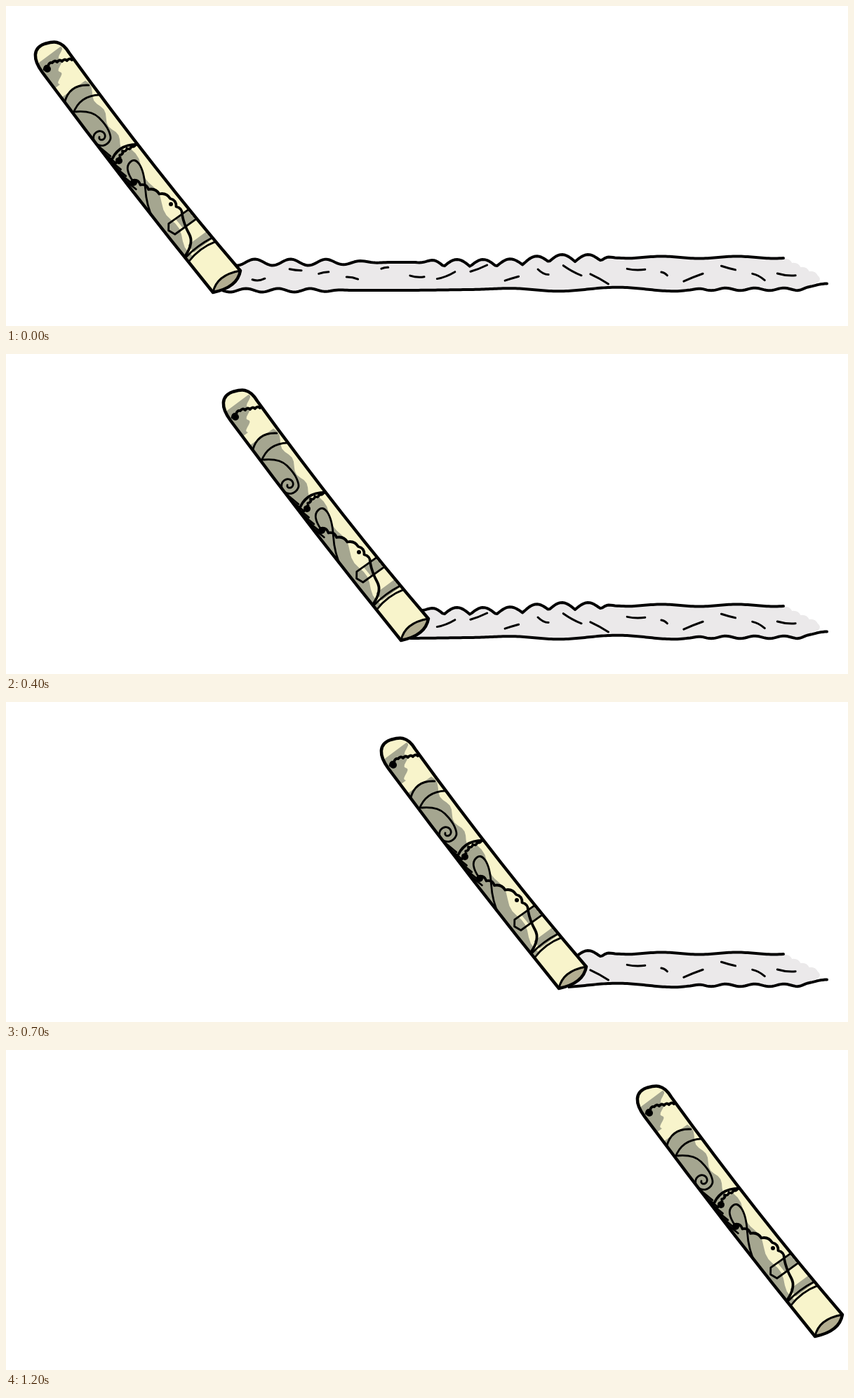
An HTML page with a canvas for the animation above (1.3 s loop, 1200 by 457 pixels).

```html
<!DOCTYPE html>
<html lang="en">
<head>
<meta charset="utf-8">
<title>Rolled note</title>
<style>
html, body { margin: 0; width: 100%; height: 100%; overflow: hidden; background: #fff; }
canvas { display: block; width: 100%; height: 100%; }
</style>
</head>
<body>
<canvas id="stage" width="1200" height="457"></canvas>
<script>
const ctx = document.getElementById('stage').getContext('2d');
const INK = '#000', CREAM = '#f8f4cb', SHADE = '#a5a690', MOUTH = '#b3ae91', POWDER = '#ebe9ea';
const STEP = 100, STEPS = 13;
const { sin, cos, abs, PI, hypot } = Math;

const mix = (a, b, k) => a + (b - a) * k;
const mixPoint = (a, b, k) => [mix(a[0], b[0], k), mix(a[1], b[1], k)];

// Smooth 0 to 1 between two limits
function ramp(x, from, to) {
  const k = Math.min(1, Math.max(0, (x - from) / (to - from)));
  return k * k * (3 - 2 * k);
}

function randomFrom(seed) {
  return () => {
    seed = (seed * 16807) % 2147483647;
    return seed / 2147483647;
  };
}

function polyline(pts, path = new Path2D()) {
  pts.forEach(p => path.lineTo(...p));
  return path;
}

// Smooth curve through points
function curve(pts) {
  const path = new Path2D(), last = pts.length - 1;
  path.moveTo(...pts[0]);
  for (let i = 1; i < last; i++) {
    const end = i === last - 1 ? pts[last] : mixPoint(pts[i], pts[i + 1], 0.5);
    path.quadraticCurveTo(...pts[i], ...end);
  }
  return path;
}

// Row of round bumps between each pair of points
function bumps(pts, size, height, path = new Path2D()) {
  path.lineTo(...pts[0]);
  for (let i = 1; i < pts.length; i++) {
    const a = pts[i - 1], b = pts[i], dx = b[0] - a[0], dy = b[1] - a[1];
    const len = hypot(dx, dy), n = Math.max(1, Math.round(len / size));
    for (let j = 0; j < n; j++) {
      const [x, y] = mixPoint(a, b, (j + 0.5) / n);
      path.quadraticCurveTo(x + dy / len * height, y - dx / len * height, ...mixPoint(a, b, (j + 1) / n));
    }
  }
  return path;
}

function stroke(path, width) {
  ctx.lineWidth = width;
  ctx.stroke(path);
}

function fill(path, color) {
  ctx.fillStyle = color;
  ctx.fill(path);
}

// Powder outline as functions of x
function topY(x) {
  const swell = 4.5 * cos((x - 380) / 8.1) * (1 - ramp(x, 440, 560));
  const inScallops = ramp(x, 580, 620) * (1 - ramp(x, 840, 870));
  const scallop = (6 - 10 * abs(sin((x - 624) * PI / 37.4))) * inScallops;
  const ripple = 1.5 * sin(x / 17) * ramp(x, 840, 900);
  return 366 - 7 * ramp(x, 700, 790) + swell + scallop + ripple;
}

function bottomY(x) {
  const left = 2.5 * cos((x - 365) / 7.3) * (1 - ramp(x, 430, 500));
  const middle = 2.8 * cos((x - 787) / 26.7) * ramp(x, 650, 780) * (1 - ramp(x, 950, 1000));
  const right = 1.8 * cos((x - 1005) / 6.6) * ramp(x, 970, 1000) * (1 - ramp(x, 1130, 1150));
  return 406 - 1.5 * ramp(x, 560, 720) - 8 * ramp(x, 1125, 1170) + left + middle + right;
}

function sample(f, from, to, step = 3) {
  const pts = [];
  for (let x = from; x <= to; x += step) pts.push([x, f(x)]);
  return pts;
}

const powderTop = polyline(sample(topY, 328, 1108));
const powderBottom = polyline(sample(bottomY, 300, 1170));
const powder = polyline(sample(topY, 328, 1108));
bumps([[1108, 361], [1157, 385], [1158, 394]], 13, 5, powder);
polyline(sample(bottomY, 300, 1134).reverse(), powder);

const crumbs = new Path2D();
const random = randomFrom(11);
for (let i = 0; i < 18; i++) {
  const x = 360 + i * 44 + random() * 10, y = 382 + 8 * cos(i * 2.3);
  const half = 4 + random() * 11, tilt = (random() - 0.4) * half, sag = 4 - random() * 7;
  crumbs.moveTo(x - half, y - tilt);
  crumbs.quadraticCurveTo(x, y + sag, x + half, y + tilt);
}

// Rolled note: t runs down its length, w across from left edge to right
const quad = (a, b, c, t) => a * (1 - t) ** 2 + 2 * b * t * (1 - t) + c * t * t;
const left = t => [mix(52, 295, t), quad(95, 259, 409, t)];
const right = t => [mix(90, 334, t), quad(67, 235.5, 378, t)];
const at = (t, w) => mixPoint(left(t), right(t), w);

const body = new Path2D();
body.moveTo(52, 95);
body.quadraticCurveTo(173.5, 259, 295, 409);
body.quadraticCurveTo(330, 402, 334, 378);
body.quadraticCurveTo(212, 235.5, 90, 67);
body.bezierCurveTo(78, 47, 66, 51, 55, 54);
body.bezierCurveTo(38, 60, 38, 76, 52, 95);
body.closePath();

const mouth = new Path2D();
mouth.moveTo(295, 409);
mouth.quadraticCurveTo(330, 402, 334, 378);
mouth.quadraticCurveTo(300, 384, 295, 409);

// Line across the note, arched towards its top
function band(t, arch, reach = 1) {
  const [x, y] = at(t, reach / 2);
  return curve([left(t), [x - arch * 0.62, y - arch * 0.79], at(t, reach)]);
}

// Shaded stretch with a wavering right side
function shade(t0, t1, w, w0, w1) {
  const pts = [at(t1, w), at(t0, w)];
  for (let k = 0; k <= 1.001; k += 0.05) {
    pts.push(at(mix(t0, t1, k), mix(w0, w1, k) + 0.07 * sin(k * 19)));
  }
  return polyline(pts);
}

const shades = [
  shade(-0.035, 0.07, 0, 0.9, 0.2),
  shade(0.11, 0.41, 0, 0.9, 0.55),
  shade(0.4, 0.85, 0, 0.75, 0.2),
  shade(0.7, 0.745, 0.5, 1, 1),
  shade(0.805, 0.84, 0.3, 1, 1)
];

const swirl = [[99, 151], [122, 149], [143, 170]];
for (let a = 0; a <= 3 * PI; a += PI / 6) {
  const r = mix(15, 2, a / (3 * PI));
  swirl.push([135 + r * cos(a), 187 + r * sin(a)]);
}

const thin = [
  band(0.13, 17, 0.9), band(0.18, 16), band(0.837, 4), band(0.856, 7),
  curve(swirl),
  curve([[210, 305], [200, 285], [197, 236], [183, 216], [169, 232], [180, 249]]),
  polyline([at(0.7, 1), at(0.7, 0.25), at(0.72, 0.12), at(0.745, 0.2), at(0.745, 1)])
];
for (let t = 0.32; t < 0.5; t += 0.03) thin.push(polyline([at(t, 0), at(t + 0.06, 0.12)]));

const bold = [
  band(0.4, 17),
  bumps([at(-0.005, 0.1), [66, 81], [94, 77]], 8, 4),
  bumps([at(0.41, 0.08), [166, 207], [185, 197]], 8, -4),
  bumps([[180, 249], [203, 262], [234, 275], [251, 298]], 14, 6),
  curve([[251, 298], [254, 313], [268, 338], [256, 356]])
];
const blots = [[59, 90, 5], [161, 221, 5], [182, 252, 5], [235, 283, 3]];

function drawPowder(x) {
  ctx.save();
  ctx.beginPath();
  ctx.rect(x + 308, 330, 1200, 100);
  ctx.clip();
  fill(powder, POWDER);
  stroke(powderTop, 4);
  stroke(powderBottom, 4);
  stroke(crumbs, 3);
  ctx.restore();
}

function drawNote(x) {
  ctx.save();
  ctx.translate(x, 0);
  fill(body, CREAM);
  ctx.save();
  ctx.clip(body);
  shades.forEach(s => fill(s, SHADE));
  thin.forEach(p => stroke(p, 2.8));
  bold.forEach(p => stroke(p, 3.8));
  ctx.fillStyle = INK;
  for (const [cx, cy, r] of blots) {
    ctx.beginPath();
    ctx.arc(cx, cy, r, 0, 2 * PI);
    ctx.fill();
  }
  ctx.restore();
  fill(mouth, MOUTH);
  stroke(mouth, 3);
  stroke(body, 4.5);
  ctx.restore();
}

// Even glide, softer at the start and finish
const noteX = s => 75 * s - 32 * ramp(s, 0, 2) - 10 * ramp(s, 10, 12);

function tick() {
  const x = noteX(Math.floor(performance.now() / STEP) % STEPS);
  ctx.fillStyle = '#fff';
  ctx.fillRect(0, 0, 1200, 457);
  ctx.strokeStyle = INK;
  ctx.lineCap = ctx.lineJoin = 'round';
  drawPowder(x);
  drawNote(x);
  requestAnimationFrame(tick);
}
tick();
</script>
</body>
</html>
```
